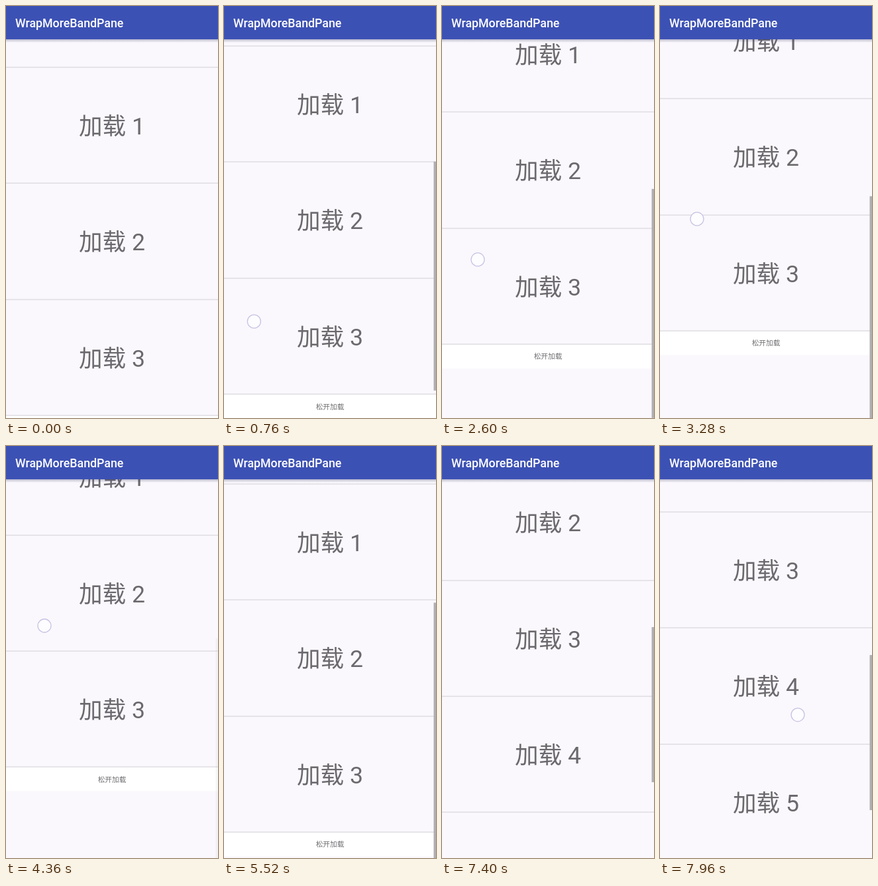
An HTML page with a canvas for the animation above (8000 ms loop, 320x619 px).

```html
<!DOCTYPE html>
<html lang="zh">
<head>
<meta charset="utf-8">
<title>Pull to load</title>
<style>
  html, body { margin: 0; width: 100%; height: 100%; overflow: hidden; background: #faf8fc; }
  canvas { display: block; width: 320px; height: 619px; }
</style>
</head>
<body>
<canvas id="stage"></canvas>
<script>
const W = 320, H = 619, BAR = 50, ROW = 174.3, FOOT = 35.5;
const LOOP = 8000, LOADED = 5680;
const FONT = 'Roboto, "Noto Sans CJK SC", "Noto Sans CJK", "Noto Sans CJK JP", sans-serif';

const canvas = document.getElementById('stage');
const ctx = canvas.getContext('2d');
const dpr = window.devicePixelRatio || 1;
canvas.width = W * dpr;
canvas.height = H * dpr;

// Smooth curve through [time, value] points that never overshoots them.
function curve(points) {
  const last = points.length - 1;
  const slope = i => (points[i + 1][1] - points[i][1]) / (points[i + 1][0] - points[i][0]);
  const tangents = points.map((p, i) => {
    if (i === 0) return slope(0);
    if (i === last) return slope(last - 1);
    const a = slope(i - 1), b = slope(i);
    return a * b <= 0 ? 0 : 2 * a * b / (a + b);
  });
  return t => {
    if (t <= points[0][0]) return points[0][1];
    if (t >= points[last][0]) return points[last][1];
    let i = 0;
    while (t >= points[i + 1][0]) i++;
    const [t0, v0] = points[i], [t1, v1] = points[i + 1];
    const d = t1 - t0, u = (t - t0) / d, w = 1 - u;
    return v0 * w * w * (1 + 2 * u) + v1 * u * u * (3 - 2 * u)
      + d * u * w * (tangents[i] * w - tangents[i + 1] * u);
  };
}

// Position of the divider above the first row.
const listTop = curve([
  [0, 92], [200, 92], [600, 70], [1000, 48], [1240, 43], [1720, 43],
  [2600, -15], [3280, -35], [3960, -40.6], [4360, -40.6], [4920, -46], [5120, -46],
  [5280, 18], [5520, 57], [5600, 59], [6440, 59], [6960, -25.5],
  [7200, -110], [7560, -173], [7960, -249.5], [8000, -257]
]);

const touches = [
  {
    from: 200, to: 5120,
    x: curve([[200, 42], [1240, 47], [1720, 47], [2600, 54], [4360, 58]]),
    y: curve([[200, 508], [1000, 463], [1240, 457], [1720, 457], [2600, 381],
      [3280, 320], [3960, 272], [4360, 270], [4920, 252]])
  },
  {
    from: 6440, to: 7200,
    x: curve([[6440, 247], [6960, 243], [7200, 236]]),
    y: curve([[6440, 502], [6960, 410], [7200, 325]])
  },
  {
    from: 7560, to: LOOP,
    x: curve([[7560, 214], [7960, 208], [8000, 207.5]]),
    y: curve([[7560, 480], [7960, 404], [8000, 396.5]])
  }
];

const thumbAlpha = curve([
  [0, 0], [240, 0], [280, 1], [4200, 1], [4360, 0.12], [4400, 0], [5120, 0], [5160, 1],
  [5870, 1], [6120, 0], [6440, 0], [6480, 1], [8000, 1]
]);

function rect(color, x, y, w, h) {
  ctx.fillStyle = color;
  ctx.fillRect(x, y, w, h);
}

function label(text, x, y, size, color, align = 'center', weight = 400) {
  ctx.font = `${weight} ${size}px ${FONT}`;
  ctx.textAlign = align;
  ctx.fillStyle = color;
  ctx.fillText(text, x, y);
}

function drawList(top, loaded) {
  const count = loaded ? 6 : 3;
  for (let i = 0; i <= count; i++) {
    const y = top + i * ROW;
    rect('#dad8dc', 0, Math.round(y) - 0.5, W, 1.2);
    if (i < count) label('加载 ' + (i + 1), W / 2, y + 101, 35.56, '#6b696d');
  }
  if (!loaded) {
    const y = top + count * ROW;
    rect('#ffffff', 0, Math.round(y) + 1, W, FOOT);
    label('松开加载', W / 2, y + 22.5, 10.67, '#6f6d71');
  }
}

function drawThumb(t, top, loaded) {
  const scroll = 396 - top;
  const y = BAR + scroll * (loaded ? 0.409 : 0.547);
  const length = loaded ? 233 : t < 4200 ? 344 : H - y;
  ctx.globalAlpha = thumbAlpha(t);
  rect('#b0aeb1', 316.5, y, 3.5, length);
  ctx.globalAlpha = 1;
}

function drawTouch(x, y) {
  ctx.beginPath();
  ctx.arc(x, y, 10, 0, 2 * Math.PI);
  ctx.fillStyle = '#fdfcff';
  ctx.fill();
  ctx.lineWidth = 1.3;
  ctx.strokeStyle = '#c8c3e4';
  ctx.stroke();
}

function drawHeader() {
  const shadow = ctx.createLinearGradient(0, BAR, 0, BAR + 5);
  shadow.addColorStop(0, 'rgba(60, 60, 110, 0.32)');
  shadow.addColorStop(1, 'rgba(60, 60, 110, 0)');
  rect(shadow, 0, BAR, W, 5);
  rect('#3c51b4', 0, 0, W, BAR);
  label('WrapMoreBandPane', 14, 32, 17.78, '#ffffff', 'left', 500);
}

function draw(t) {
  const top = listTop(t), loaded = t >= LOADED;
  ctx.setTransform(dpr, 0, 0, dpr, 0, 0);
  rect('#faf8fc', 0, 0, W, H);
  drawList(top, loaded);
  drawThumb(t, top, loaded);
  drawHeader();
  for (const touch of touches) {
    if (t >= touch.from && t < touch.to) drawTouch(touch.x(t), touch.y(t));
  }
}

const start = performance.now();
function tick() {
  draw((performance.now() - start) % LOOP);
  requestAnimationFrame(tick);
}
tick();
</script>
</body>
</html>
```
